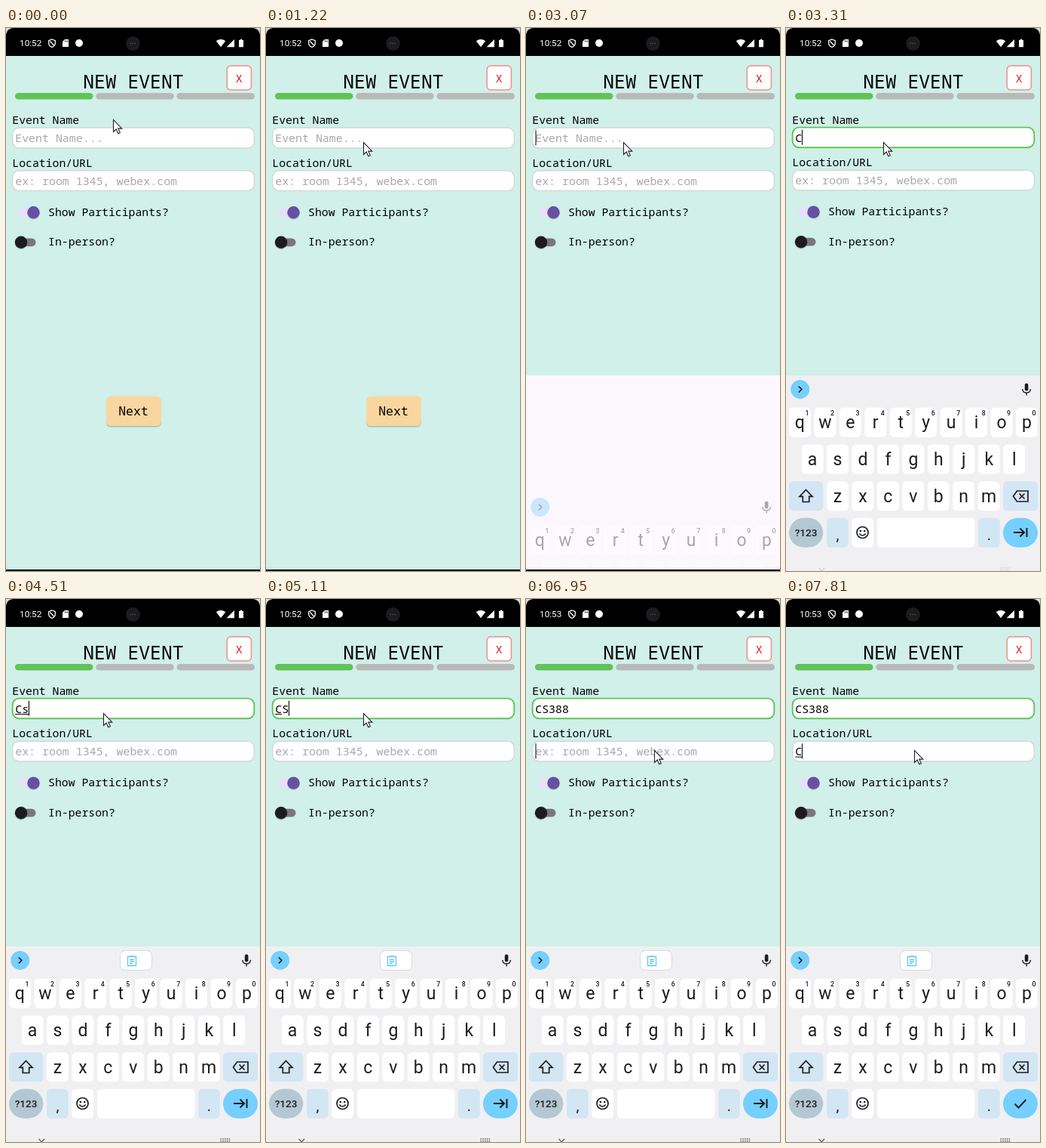
Write an HTML page that moves like this. It is 337x719 px and loops after 8000 ms.

```html
<!DOCTYPE html>
<html lang="en">
<head>
<meta charset="utf-8">
<title>New event form</title>
<style>
html, body { margin: 0; width: 100%; height: 100%; overflow: hidden; background: #d0f0e9; }
svg { display: block; width: 100%; height: 100%; }
text { white-space: pre; }
.mono { font-family: "Noto Sans Mono", "DejaVu Sans Mono", monospace; font-size: 14.8px; fill: #000; }
.field { font-size: 14.93px; }
.hint { fill: #a9a9a9; }
.keys { font-family: Roboto, Inter, sans-serif; fill: #1b1c1e; text-anchor: middle; }
.line { fill: none; stroke: #1b1c1e; stroke-width: 1.7; }
</style>
</head>
<body>
<svg viewBox="0 0 337 719" xmlns="http://www.w3.org/2000/svg">
  <rect width="337" height="719" fill="#d0f0e9"/>
  <rect width="337" height="37" fill="#000"/>
  <path d="M0 0H9Q1 1 0 9ZM337 0H328Q336 1 337 9Z" fill="#d9d9d9"/>

  <!-- status bar -->
  <text id="clock" x="18" y="24.3" font-family="Roboto, sans-serif" font-size="11.8" fill="#fff"></text>
  <g fill="none" stroke="#fff" stroke-width="1.3">
    <path d="M61 15l4.3 1.7v3.2q0 3.700-4.300 5.600q-4.300-1.900-4.300-5.600v-3.200z"/>
    <path d="M58.500 17.500l5 5.500"/>
  </g>
  <path d="M78 15h5v10h-8v-7z" fill="#fff"/>
  <path d="M78.300 16.500v2M80 16.500v2M81.600 16.500v2" stroke="#000" stroke-width=".8"/>
  <circle cx="97" cy="20" r="5" fill="#fff"/>
  <circle cx="168.500" cy="20.500" r="9.500" fill="#1c1c1f"/>
  <path d="M164.500 20.500h8" stroke="#4b4b55" stroke-width="1.300" stroke-dasharray="1.500 1.500"/>
  <path d="M278.800 17.300q6.200-4.800 12.400 0l-6.200 8zM303 15v10.300h-10.300zM309 16h1.800v-1.200h2.400v1.200h1.800v9.300h-6z" fill="#fff"/>

  <!-- heading -->
  <text class="mono" x="102.200" y="79.500" style="font-size:24.700px">NEW EVENT</text>
  <rect x="293.200" y="50" width="32.200" height="32" rx="5" fill="#fff" stroke="#f08f8b" stroke-width="1.500"/>
  <text class="mono" x="304.700" y="71.500" style="fill:#e51010">X</text>
  <rect x="12" y="86" width="103.500" height="8.600" rx="4.300" fill="#60c456"/>
  <rect x="119.300" y="86" width="103.500" height="8.600" rx="4.300" fill="#b9b9b9"/>
  <rect x="226.500" y="86" width="103.500" height="8.600" rx="4.300" fill="#b9b9b9"/>

  <!-- form -->
  <text class="mono" x="8.300" y="127">Event Name</text>
  <g id="form">
    <rect id="box" x="8.700" y="132.200" width="320.600" height="26.600" rx="8.500" fill="#fff"/>
    <text id="hint1" class="mono field hint" x="12.200" y="151.300">Event Name...</text>
    <text id="text1" class="mono field" x="12.200" y="151.300"></text>
    <text class="mono" x="8.300" y="183.700">Location/URL</text>
    <rect x="8.700" y="188.900" width="320.600" height="26.600" rx="8.500" fill="#fff" stroke="#cfd3d2" stroke-width="1.200"/>
    <text id="hint2" class="mono field hint" x="12.200" y="208">ex: room 1345, webex.com</text>
    <text id="text2" class="mono field" x="12.200" y="208"></text>
    <rect x="16.500" y="238.800" width="26" height="10.800" rx="5.400" fill="#ecdcfd"/>
    <circle cx="36.500" cy="245.300" r="8.300" fill="#000" opacity=".18"/>
    <circle cx="36.500" cy="244.200" r="8.200" fill="#674fa3"/>
    <text class="mono" x="56" y="249">Show Participants?</text>
    <rect x="14" y="278.400" width="25.500" height="10.800" rx="5.400" fill="#7c757e"/>
    <circle cx="20" cy="285" r="8.300" fill="#000" opacity=".18"/>
    <circle cx="20" cy="283.800" r="8.200" fill="#1d1b20"/>
    <text class="mono" x="56" y="288.300">In-person?</text>
    <path id="under" stroke="#000" stroke-width="1"/>
    <rect id="caret"/>
  </g>

  <rect x="133" y="490" width="73" height="39" rx="6" fill="#000" opacity=".1"/>
  <rect x="133" y="489" width="73" height="39" rx="6" fill="#000" opacity=".12"/>
  <rect x="133" y="487.500" width="73" height="39.500" rx="6" fill="#f9d69f"/>
  <text class="mono" x="149.200" y="513.300" style="font-size:16.500px">Next</text>

  <!-- keyboard -->
  <rect id="panel" y="460" width="337" height="259"/>
  <g id="kb">
    <circle cx="18.700" cy="478.500" r="12.500" fill="#75cfff"/>
    <path class="line" d="M16.800 474.500l4 4-4 4"/>
    <rect x="316.800" y="470.500" width="4.600" height="10" rx="2.300" fill="#1b1c1e"/>
    <path class="line" style="stroke-width:1.400" d="M313.800 478q0 5 5.300 5t5.300-5M319.100 483v3.500"/>
    <g id="chip">
      <rect x="151.500" y="465.500" width="42" height="26" rx="7" fill="#fff" stroke="#d0dbe3"/>
      <path d="M161.500 473.500h11v12h-11zM164.500 473h5M164 477.500h6M164 480h6M164 482.500h4" fill="none" stroke="#62c6ee" stroke-width="1.300"/>
    </g>
    <g id="keys" class="keys"></g>
    <path id="shift" class="line" d="M26.500 611.500l8.500 8.800h-4.300v7.200h-8.400v-7.200h-4.300z"/>
    <path class="line" d="M306.500 613h14.500v14h-14.500l-5-7zM309.500 616.500l7 7M316.500 616.500l-7 7"/>
    <circle class="line" cx="101.500" cy="668" r="7.500"/>
    <path class="line" d="M97.300 669.500q4.200 5 8.400 0"/>
    <circle cx="98.800" cy="666" r="1.200"/><circle cx="104.200" cy="666" r="1.200"/>
    <path id="enter" class="line" style="stroke-width:2"/>
    <g id="nav">
      <path d="M43.500 715l3.800 3.800 3.800-3.800" fill="none" stroke="#555" stroke-width="1.200"/>
      <path d="M284.500 715h13M284.500 717.800h13" stroke="#555" stroke-width="1.500" stroke-dasharray="1.500 1.300"/>
    </g>
  </g>
  <rect id="edge" y="717" width="337" height="2" fill="#000"/>

  <path id="mouse" d="M.5.500v16l3.700-3.500 2.600 5.700 2.500-1.100-2.500-5.500h5z" fill="#fff" stroke="#222" stroke-width="1.100"/>
</svg>
<script>
const LOOP = 8000, CHAR = 8.95, LEFT = 12.2;
const $ = id => document.getElementById(id);
const set = (id, attrs) => { for (const k in attrs) $(id).setAttribute(k, attrs[k]); };
const letters = [];

function node(tag, attrs, text = '') {
  const el = document.createElementNS('http://www.w3.org/2000/svg', tag);
  for (const k in attrs) el.setAttribute(k, attrs[k]);
  el.textContent = text;
  $('keys').append(el);
  return el;
}
const key = (x, y, width, fill = '#fff', rx = 5.5) =>
  node('rect', { x, y, width, height: 39, rx, fill });
const label = (s, x, y, size, weight = 400) =>
  node('text', { x, y, 'font-size': size, 'font-weight': weight }, s);

[['qwertyuiop', 4, 502.7], ['asdfghjkl', 20.7, 551.5], ['zxcvbnm', 54, 600.3]].forEach(([row, left, y], r) => {
  [...row].forEach((ch, i) => {
    const x = left + i * 33.45;
    key(x, y, 28.8);
    letters.push([label(ch, x + 14.4, y + 27.3, 23), ch]);
    if (!r) label((i + 1) % 10, x + 24, y + 10.5, 8.8, 500);
  });
});
key(4, 600.3, 45.3, '#d3e6f4');
key(288, 600.3, 46, '#d3e6f4');
key(4, 648.8, 45.3, '#b3c8d3', 19.5);
key(54, 648.8, 28.8, '#d3e6f4');
key(87.3, 648.8, 28.8);
key(121, 648.8, 129.3);
key(255, 648.8, 28.8, '#d3e6f4');
key(288, 648.8, 46, '#75cfff', 19.5);
label('?123', 26.6, 673.3, 13.5, 500);
label(',', 68.4, 678, 20);
label('.', 269.4, 678, 20);

// Each step changes only the values it names; caret 0 = hidden, 1 / 2 = field.
const steps = [
  [0, { mouse: [142, 121], clock: '10:52', caret: 0, text1: '', text2: '', under: 0, rise: 156, fade: 0,
        chip: 0, nav: 0, upper: 0, check: 0 }],
  [120, { mouse: [126, 141] }],
  [240, { mouse: [110, 158] }],
  [360, { mouse: [118, 156] }],
  [480, { mouse: [129, 151] }],
  [850, { caret: 1 }],
  [1220, { caret: 0 }],
  [1710, { caret: 1 }],
  [2200, { caret: 0 }],
  [2700, { caret: 1 }],
  [3070, { fade: .36 }],
  [3190, { rise: 14, fade: .92 }],
  [3310, { rise: 0, fade: 1, text1: 'C', nav: .2 }],
  [3550, { under: 1, nav: .35 }],
  [3670, { text1: 'Cs', chip: 1 }],
  [3790, { under: 2, nav: .5 }],
  [4030, { nav: .75 }],
  [4390, { caret: 0 }],
  [4510, { caret: 1, nav: 1 }],
  [4750, { text1: 'C', under: 1 }],
  [4870, { upper: 1 }],
  [5110, { text1: 'CS', upper: 0 }],
  [5230, { under: 2 }],
  [5480, { text1: 'CS3', clock: '10:53' }],
  [5600, { text1: 'CS388', under: 4 }],
  [5840, { under: 0 }],
  [6340, { caret: 0, mouse: [139, 162] }],
  [6460, { mouse: [160, 189] }],
  [6580, { mouse: [170, 200] }],
  [6830, { caret: 1 }],
  [6950, { caret: 2 }],
  [7320, { caret: 0 }],
  [7440, { check: 1 }],
  [7810, { caret: 2, text2: 'C', under: 1 }]
];

function draw(s) {
  const typed = s.text1 !== '', up = s.fade > .5;
  set('mouse', { transform: `translate(${s.mouse})` });
  $('clock').textContent = s.clock;
  $('text1').textContent = s.text1;
  $('text2').textContent = s.text2;
  set('hint1', { opacity: typed ? 0 : 1 });
  set('hint2', { opacity: s.text2 ? 0 : 1 });
  set('box', typed ? { stroke: '#60c456', 'stroke-width': 1.9 } : { stroke: '#cfd3d2', 'stroke-width': 1.2 });
  set('form', { transform: `translate(0 ${typed ? -.6 : 0})` });

  const second = s.caret === 2, count = (second ? s.text2 : s.text1).length;
  set('caret', {
    x: count ? LEFT + count * CHAR - .3 : 12.2, y: second ? 192 : 135.3,
    width: count ? 1.3 : 1.7, height: 20, fill: count ? '#222' : '#666', opacity: s.caret ? 1 : 0
  });
  set('under', { d: `M${LEFT} ${s.text2 ? 209.8 : 153.1}h${s.under * CHAR}`, opacity: s.under ? 1 : 0 });

  set('panel', { fill: up ? '#f0f0f2' : '#fcf7fd', opacity: s.fade ? 1 : 0 });
  set('kb', { transform: `translate(0 ${s.rise})`, opacity: s.fade });
  set('chip', { opacity: s.chip });
  set('nav', { opacity: s.nav });
  set('edge', { opacity: up ? 0 : 1 });
  $('shift').style.fill = s.upper ? '#1b1c1e' : 'none';
  set('enter', { d: s.check ? 'M303.500 668.500l5 5 10-10.500' : 'M302 668h13.500M310.500 662.500l5.500 5.500-5.500 5.500M319.500 662v12' });
  for (const [el, ch] of letters) el.textContent = s.upper ? ch.toUpperCase() : ch;
}

let last = -1;
function tick() {
  const t = performance.now() % LOOP;
  const past = steps.filter(([at]) => at <= t);
  if (past.length !== last) {
    last = past.length;
    draw(Object.assign({}, ...past.map(p => p[1])));
  }
  requestAnimationFrame(tick);
}
tick();
</script>
</body>
</html>
```
